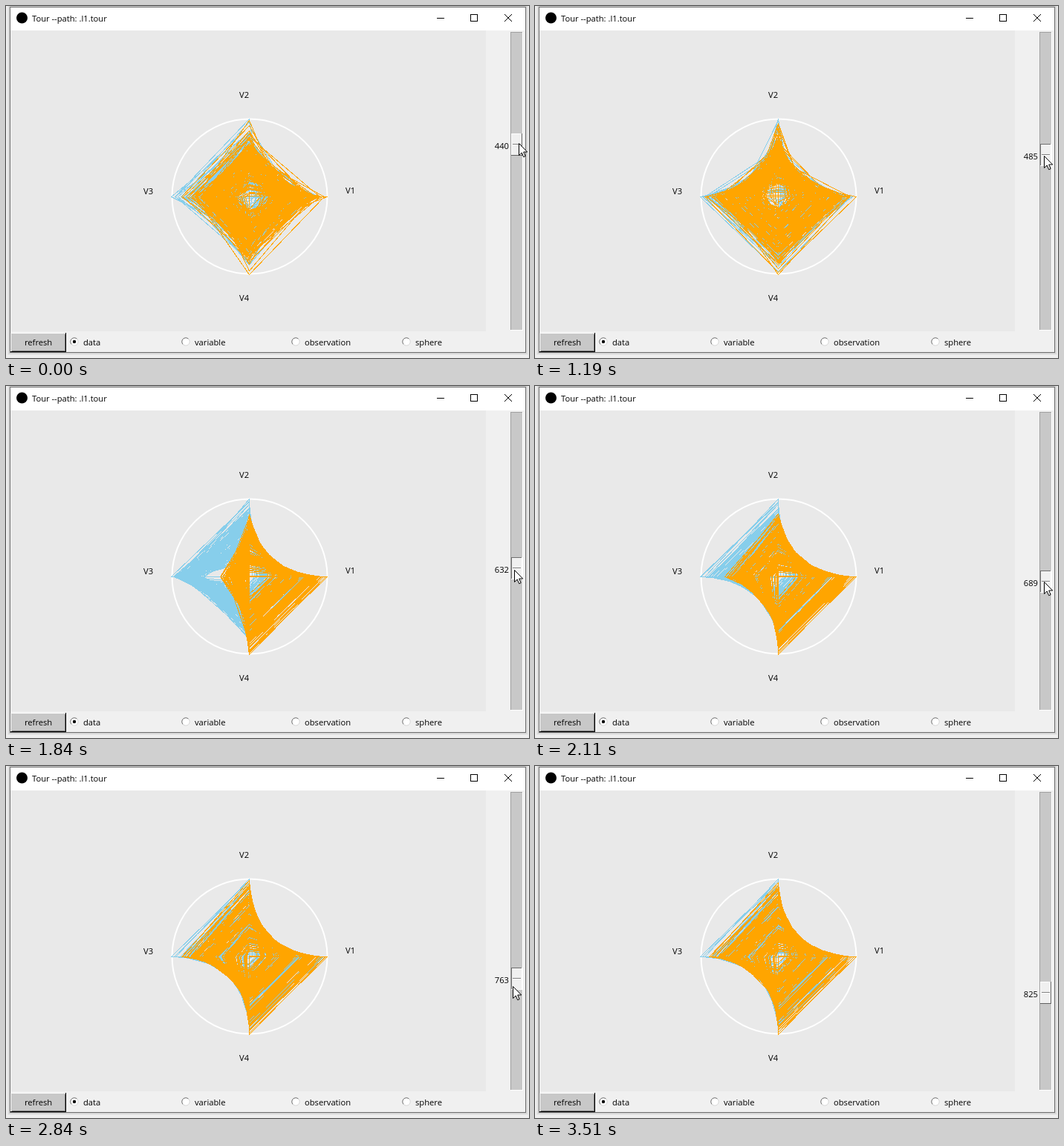
Write an HTML page that moves like this. It is 704x475 px and loops after 3.81 s.

```html
<!DOCTYPE html>
<html lang="en">
<head>
<meta charset="utf-8">
<title>Tour</title>
<style>
  html, body { margin: 0; width: 100%; height: 100%; overflow: hidden; background: #f0f0f0; }
  svg { display: block; }
  text { font: 11.2px "Open Sans", "Noto Sans", sans-serif; fill: #000; }
  .crisp { shape-rendering: crispEdges; }
  .line { fill: none; stroke-width: 1; }
  .data { fill: none; stroke-width: 1; stroke-linejoin: bevel; shape-rendering: crispEdges; }
</style>
</head>
<body>
<svg width="704" height="475" viewBox="0 0 704 475">
  <rect width="704" height="475" fill="#efefef"/>
  <g fill="none" stroke="#000">
    <rect x="4.5" y=".5" width="696" height="468" opacity=".12"/>
    <rect x="3.5" y="-.5" width="698" height="470" opacity=".08"/>
    <rect x="2.5" y="-1.5" width="700" height="472" opacity=".04"/>
  </g>

  <g class="crisp">
    <rect x="5.5" y="1.5" width="694" height="466" fill="#f0f0f0" stroke="#707070"/>
    <rect x="6" y="2" width="693" height="31" fill="#fff"/>
    <rect x="7" y="33" width="639" height="406" fill="#e9e9e9"/>
  </g>
  <circle cx="21.500" cy="16" r="7.500"/>
  <text x="35" y="21">Tour --path: .l1.tour</text>
  <g class="line" stroke="#000">
    <path class="crisp" d="M580 16.500H590M625.500 11.500H634.500V20.500H625.500Z"/>
    <path d="M671 11L681 21M681 11L671 21"/>
  </g>

  <circle cx="328" cy="257" r="104.500" fill="none" stroke="#fff" stroke-width="2"/>
  <path class="data" id="blue" stroke="#87ceeb"/>
  <path class="data" id="orange" stroke="#ffa500"/>
  <text x="457" y="253">V1</text>
  <text x="314" y="124">V2</text>
  <text x="185" y="254">V3</text>
  <text x="314" y="398">V4</text>

  <g class="crisp">
    <rect x="6" y="441" width="75" height="26" fill="#c8c8c8"/>
    <path class="line" stroke="#fff" d="M6.500 466V441.500H80"/>
    <path class="line" stroke="#707070" d="M8 465.500H79.500V443"/>
    <path class="line" stroke="#000" d="M6 466.500H80.500V441"/>
  </g>
  <text x="25" y="458">refresh</text>
  <g id="radios"></g>

  <g class="crisp">
    <rect x="679" y="35" width="16" height="402" fill="#c8c8c8"/>
    <path class="line" stroke="#a0a0a0" d="M679.500 437V35.500H695"/>
    <path class="line" stroke="#fff" d="M679 437.500H695.500V35"/>
  </g>
  <g id="thumb" class="crisp">
    <rect x="680" width="15" height="30" fill="#f0f0f0"/>
    <path class="line" id="lit" d="M680.500 29V.500H694"/>
    <path class="line" id="shade" d="M680 29.500H694.500V0"/>
    <path class="line" stroke="#808080" d="M682 14.500H693"/>
    <path class="line" stroke="#fff" d="M682 15.500H693"/>
  </g>
  <text id="value" x="677" text-anchor="end"></text>
  <path id="cursor" fill="#fff" stroke="#000" d="M.500 .500V16.500L4.200 13 6.700 18.700 9.100 17.700 6.700 12H11.700Z"/>
</svg>

<script>
const el = id => document.getElementById(id);
const LOOP = 3810, COUNT = 160, CX = 327.5, CY = 257.5, R = 105;

el('radios').innerHTML = ['data', 'variable', 'observation', 'sphere'].map((name, i) => {
  const x = [92, 242, 390, 539][i];
  return `<circle cx="${x}" cy="453" r="5" fill="#fff"/>
    <g class="line"><path stroke="#707070" d="M${x - 3.7} 456.700A5.200 5.200 0 0 1 ${x + 3.7} 449.300"/>
    <path stroke="#d8d8d8" d="M${x - 3.7} 456.700A5.200 5.200 0 0 0 ${x + 3.7} 449.300"/></g>
    ${i ? '' : `<circle cx="${x}" cy="453" r="2.200"/>`}
    <text x="${x + 12}" y="458">${name}</text>`;
}).join('');

let seed = 7;
function rand() {
  seed = seed + 0x6D2B79F5 | 0;
  let h = Math.imul(seed ^ seed >>> 15, 1 | seed);
  h = h + Math.imul(h ^ h >>> 7, 61 | h) ^ h;
  return ((h ^ h >>> 14) >>> 0) / 4294967296;
}
const spread = () => rand() * 1.3 + rand() * .7 - 1;
const noise = () => rand() + rand() - 1;

// Each observation: two shared factors, its group and one error per axis.
const points = Array.from({ length: COUNT * 2 }, (_, i) => ({
  u: spread(), p: spread(), group: i < COUNT ? -1 : 1,
  e: [noise(), noise(), noise(), noise()]
}));

// Projections along the tour: per axis the weights of u, p, group and error.
const tour = [
  [440, [[.6, 0, .12, .5], [-.3, .7, .03, .4], [-.3, .7, -.06, .3], [.2, .7, .05, .4]]],
  [485, [[.9, .2, .05, .35], [-.8, .25, .04, .4], [.7, .25, -.06, .45], [.9, .2, 0, .35]]],
  [569, [[1, 0, .25, .1], [-1, 0, -.2, .1], [.8, 0, -.38, .2], [1, 0, .1, .25]]],
  [689, [[1, 0, .2, .06], [-1, 0, -.17, .15], [-.9, 0, -.28, .2], [1, 0, .27, .1]]],
  [763, [[1, 0, .04, .06], [-1, 0, .02, .1], [-1, 0, -.05, .13], [1, 0, .04, .08]]],
  [825, [[1, 0, .03, .08], [-1, 0, 0, .12], [-1, 0, -.03, .14], [1, 0, .02, .14]]]
];

function weightsAt(v) {
  const i = Math.max(1, tour.findIndex(k => k[0] >= v));
  const [v0, a] = tour[i - 1], [v1, b] = tour[i];
  const f = (v - v0) / (v1 - v0);
  return a.map((row, r) => row.map((w, c) => w + (b[r][c] - w) * f));
}

function drawPlot(v) {
  const axes = weightsAt(v).map(([u, p, g, e], i) => {
    const raw = points.map(o => u * o.u + p * o.p + g * o.group + e * o.e[i]);
    const lo = Math.min(...raw), hi = Math.max(...raw);
    return raw.map(x => Math.round((x - lo) / (hi - lo) * R));
  });
  const shapes = points.map((_, i) => {
    const [right, top, left, bottom] = axes.map(a => a[i]);
    return `M${CX + right} ${CY}L${CX} ${CY - top} ${CX - left} ${CY} ${CX} ${CY + bottom}Z`;
  });
  el('blue').setAttribute('d', shapes.slice(0, COUNT).join(''));
  el('orange').setAttribute('d', shapes.slice(COUNT).join(''));
}

// time, slider value, plotted value, cursor x, cursor y, pressed
const steps = [
  [0, 440, 440, 690, 185, 0],
  [680, 440, 440, 686, 185, 0],
  [830, 443, 440, 686, 188, 1],
  [950, 450, 440, 686, 193, 1],
  [1070, 464, 462, 685, 197, 1],
  [1190, 485, 485, 685, 202, 1],
  [1340, 511, 511, 684, 211, 1],
  [1460, 540, 540, 682, 220, 1],
  [1600, 569, 569, 680, 229, 1],
  [1720, 600, 600, 682, 238, 1],
  [1840, 632, 632, 684, 248, 1],
  [1990, 663, 663, 685, 256, 1],
  [2110, 689, 689, 685, 264, 1],
  [2260, 697, 697, 685, 264, 1],
  [2540, 720, 697, 685, 274, 1],
  [2690, 737, 737, 684, 284, 1],
  [2840, 763, 763, 682, 297, 1],
  [2990, 786, 786, 681, 308, 1],
  [3110, 808, 808, 680, 318, 1],
  [3230, 825, 825, 677, 340, 1],
  [3350, 825, 825, 668, 462, 0],
  [3510, 825, 825, 668, 500, 0]
];

let shown, plotted;
function show(step) {
  const [, value, plot, x, y, pressed] = step;
  const offset = Math.round((value - 440) * .309);
  el('thumb').setAttribute('transform', `translate(0 ${172 + offset})`);
  el('lit').setAttribute('stroke', pressed ? '#707070' : '#fff');
  el('shade').setAttribute('stroke', pressed ? '#fff' : '#606060');
  el('value').setAttribute('y', 193 + offset);
  el('value').textContent = value;
  el('cursor').setAttribute('transform', `translate(${x} ${y})`);
  if (plot !== plotted) drawPlot(plotted = plot);
}

function tick() {
  const t = performance.now() % LOOP;
  const step = steps.findLast(s => s[0] <= t);
  if (step !== shown) show(shown = step);
  requestAnimationFrame(tick);
}
tick();
</script>
</body>
</html>
```
